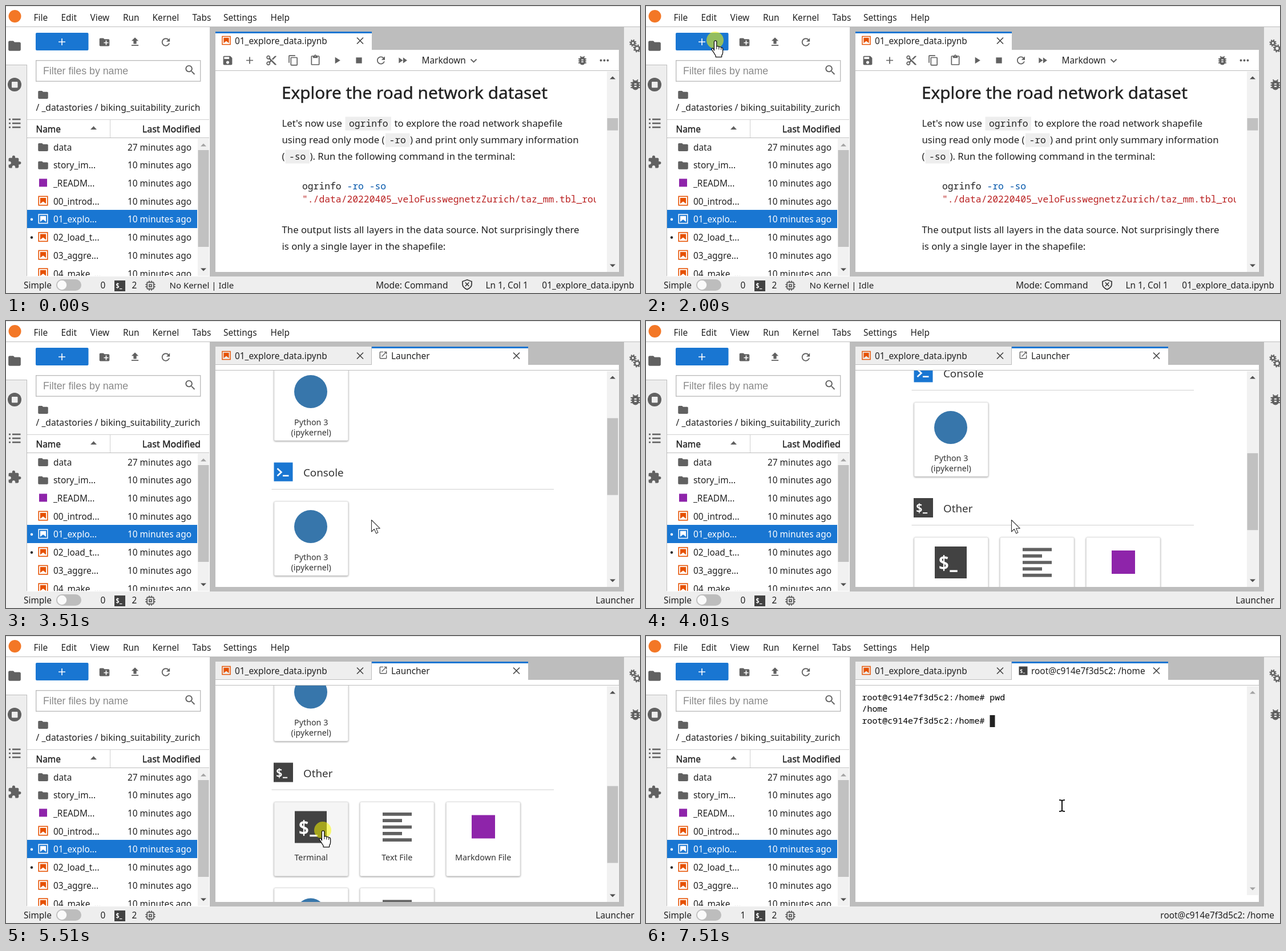
These frames come from a looping animation (1111 px wide and 504 px high, 8 s). An HTML page:

```html
<!DOCTYPE html>
<html lang="en">
<head>
<meta charset="utf-8">
<title>Opening a terminal from the launcher</title>
<style>
html, body { margin: 0; width: 100%; height: 100%; overflow: hidden; background: #fff; }
svg { display: block; width: 100%; height: 100%; }
text { font: 15.4px "Noto Sans", sans-serif; fill: #212121; white-space: pre; }
.medium { stroke: #212121; stroke-width: .4; }
.body { font-size: 16.73px; }
.code { font: 16.35px "Noto Sans Mono", monospace; }
.term { font: 14.93px "Noto Sans Mono", monospace; fill: #000; }
.section { font-size: 18.8px; fill: #333; }
.label { font-size: 14.3px; fill: #333; text-anchor: middle; }
.hint { font: 17.8px "Liberation Sans", Arial, sans-serif; fill: #8a8a8a; }
.end { text-anchor: end; }
.white { fill: #fff; }
.card { filter: drop-shadow(0 1px 1.5px rgba(0,0,0,.4)); }
</style>
</head>
<body>
<svg id="stage" viewBox="0 0 1111 504">
  <defs>
    <clipPath id="files"><rect x="37" y="232" width="300" height="242"/></clipPath>
    <clipPath id="pane"><rect x="367" y="87" width="686" height="380"/></clipPath>
    <clipPath id="codeBox"><rect x="500" y="300" width="534" height="60"/></clipPath>
    <clipPath id="tabText"><rect x="641" y="45" width="244" height="32"/></clipPath>
  </defs>
  <g id="frame"></g>
  <g id="view"></g>
  <g id="pointer"></g>
</svg>
<script>
const GREY = '#616161', LINE = '#bdbdbd', BLUE = '#1976d2', ORANGE = '#e65100', PURPLE = '#8e24aa';
const HOST = 'root@c914e7f3d5c2';
const FILE = '01_explore_data.ipynb';
const LOOP = 8000;

const icons = {
  folder: 'M10 4H4c-1.1 0-2 .9-2 2v12c0 1.1.9 2 2 2h16c1.1 0 2-.9 2-2V8c0-1.1-.9-2-2-2h-8l-2-2z',
  puzzle: 'M20.5 11H19V7c0-1.1-.9-2-2-2h-4V3.5C13 2.12 11.88 1 10.5 1S8 2.12 8 3.5V5H4c-1.1 0-2 .9-2 2v3.8h1.5c1.49 0 2.7 1.21 2.7 2.7s-1.21 2.7-2.7 2.7H2V20c0 1.1.9 2 2 2h3.8v-1.5c0-1.49 1.21-2.7 2.7-2.7s2.7 1.21 2.7 2.7V22H17c1.1 0 2-.9 2-2v-4h1.5c1.38 0 2.5-1.12 2.5-2.5S21.88 11 20.5 11z',
  upload: 'M5 20h14v-2H5v2zM5 10h4v6h6v-6h4l-7-7-7 7z',
  refresh: 'M17.65 6.35C16.2 4.9 14.21 4 12 4c-4.42 0-8 3.58-8 8s3.58 8 8 8c3.73 0 6.84-2.55 7.73-6h-2.08c-.82 2.33-3.04 4-5.65 4-3.31 0-6-2.69-6-6s2.69-6 6-6c1.66 0 3.14.69 4.22 1.78L13 11h7V4l-2.35 2.35z',
  search: 'M15.5 14h-.79l-.28-.27C15.41 12.59 16 11.11 16 9.5 16 5.91 13.09 3 9.5 3S3 5.91 3 9.5 5.91 16 9.5 16c1.61 0 3.09-.59 4.23-1.57l.27.28v.79l5 4.99L20.49 19l-4.99-5zm-6 0C7.01 14 5 11.99 5 9.5S7.01 5 9.5 5 14 7.01 14 9.5 11.99 14 9.5 14z',
  save: 'M17 3H5c-1.11 0-2 .9-2 2v14c0 1.1.89 2 2 2h14c1.1 0 2-.9 2-2V7l-4-4zm-5 16c-1.66 0-3-1.34-3-3s1.34-3 3-3 3 1.34 3 3-1.34 3-3 3zm3-10H5V5h10v4z',
  cut: 'M9.64 7.64c.23-.5.36-1.05.36-1.64 0-2.21-1.79-4-4-4S2 3.79 2 6s1.79 4 4 4c.59 0 1.14-.13 1.64-.36L10 12l-2.36 2.36C7.14 14.13 6.59 14 6 14c-2.21 0-4 1.79-4 4s1.79 4 4 4 4-1.79 4-4c0-.59-.13-1.14-.36-1.64L12 14l7 7h3v-1L9.64 7.64zM6 8c-1.1 0-2-.89-2-2s.9-2 2-2 2 .89 2 2-.9 2-2 2zm0 12c-1.1 0-2-.89-2-2s.9-2 2-2 2 .89 2 2-.9 2-2 2zM19 3l-6 6 2 2 7-7V3z',
  copy: 'M16 1H4c-1.1 0-2 .9-2 2v14h2V3h12V1zm3 4H8c-1.1 0-2 .9-2 2v14c0 1.1.9 2 2 2h11c1.1 0 2-.9 2-2V7c0-1.1-.9-2-2-2zm0 16H8V7h11v14z',
  paste: 'M19 2h-4.18C14.4.84 13.3 0 12 0s-2.4.84-2.82 2H5c-1.1 0-2 .9-2 2v16c0 1.1.9 2 2 2h14c1.1 0 2-.9 2-2V4c0-1.1-.9-2-2-2zm-7 0c.55 0 1 .45 1 1s-.45 1-1 1-1-.45-1-1 .45-1 1-1zm7 18H5V4h2v3h10V4h2v16z',
  play: 'M8 5v14l11-7z',
  stop: 'M5.5 5.5h13v13h-13z',
  forward: 'M4 18l8.5-6L4 6v12zm9-12v12l8.5-6L13 6z',
  bug: 'M20 8h-2.81c-.45-.78-1.07-1.45-1.82-1.96L17 4.41 15.59 3l-2.17 2.17a6 6 0 0 0-2.83 0L8.41 3 7 4.41l1.62 1.63C7.88 6.55 7.26 7.22 6.81 8H4v2h2.09c-.05.33-.09.66-.09 1v1H4v2h2v1c0 .34.04.67.09 1H4v2h2.81c1.04 1.79 2.97 3 5.19 3s4.15-1.21 5.19-3H20v-2h-2.09c.05-.33.09-.66.09-1v-1h2v-2h-2v-1c0-.34-.04-.67-.09-1H20V8zm-6 8h-4v-2h4v2zm0-4h-4v-2h4v2z',
  open: 'M19 19H5V5h7V3H5c-1.11 0-2 .9-2 2v14c0 1.1.89 2 2 2h14c1.1 0 2-.9 2-2v-7h-2v7zM14 3v2h3.59l-9.83 9.83 1.41 1.41L19 6.41V10h2V3h-7z',
  lines: 'M15 15H3v2h12v-2zm0-8H3v2h12V7zM3 13h18v-2H3v2zm0 8h18v-2H3v2zM3 3v2h18V3H3z',
  chip: 'M15 9H9v6h6V9zm-2 4h-2v-2h2v2zm8-2V9h-2V7c0-1.1-.9-2-2-2h-2V3h-2v2h-2V3H9v2H7c-1.1 0-2 .9-2 2v2H3v2h2v2H3v2h2v2c0 1.1.9 2 2 2h2v2h2v-2h2v2h2v-2h2c1.1 0 2-.9 2-2v-2h2v-2h-2v-2h2zm-4 6H7V7h10v10z'
};

const rect = (x, y, w, h, fill, more = '') => `<rect x="${x}" y="${y}" width="${w}" height="${h}" fill="${fill}" ${more}/>`;
const circle = (x, y, r, fill, more = '') => `<circle cx="${x}" cy="${y}" r="${r}" fill="${fill}" ${more}/>`;
const path = (d, fill, more = '') => `<path d="${d}" fill="${fill}" ${more}/>`;
const stroke = (d, color, w) => path(d, 'none', `stroke="${color}" stroke-width="${w}"`);
const text = (x, y, s, cls = '', more = '') => `<text x="${x}" y="${y}" class="${cls}" ${more}>${s}</text>`;
const icon = (name, x, y, size, fill = GREY) =>
  path(icons[name], fill, `transform="translate(${x} ${y}) scale(${size / 24}) translate(-12 -12)"`);
const plus = (x, y, r, color, w) => stroke(`M${x - r} ${y}h${2 * r}M${x} ${y - r}v${2 * r}`, color, w);
const cross = (x, y) => stroke(`M${x - 5.5} ${y - 5.5}l11 11m0-11l-11 11`, '#424242', 1.6);

// Framed bookmark, w is the outer width
function notebook(x, y, w, color = ORANGE) {
  const k = w / 18.4;
  return `<g transform="translate(${x} ${y}) scale(${k})">` +
    rect(-8.4, -8.4, 16.8, 16.8, 'none', `stroke="${color}" stroke-width="1.7"`) +
    path('M5.5 5.5L0 1.2-5.5 5.5v-11h11z', color) + '</g>';
}

function terminalIcon(x, y, w) {
  return rect(x - w / 2, y - w / 2, w, w, '#424242') +
    text(x - w * .4, y + w * .24, '$', 'white', `style="font:600 ${w * .62}px 'Noto Sans Mono',monospace"`) +
    rect(x - w * .03, y + w * .24, w * .24, w * .06, '#fff');
}

function scrollbar(x, top, bottom, thumb, upOn, downOn) {
  const arrow = (y, dir, on) => path(`M${x - 5} ${y + 2.5 * dir}h10l-5 ${-5 * dir}z`, on ? '#505050' : '#a3a3a3');
  return rect(x - 10, top, 20, bottom - top, '#f1f1f1') +
    (thumb ? rect(x - 9.5, thumb[0], 19, thumb[1], '#c1c1c1') : '') +
    arrow(top + 11, 1, upOn) + arrow(bottom - 11, -1, downOn);
}

function gear(x, y, r) {
  return circle(x, y, r, 'none', `stroke="${GREY}" stroke-width="2.6"`) +
    circle(x, y, r + 2, 'none', `stroke="${GREY}" stroke-width="2" stroke-dasharray="${(r + 2) * Math.PI / 8}"`);
}

function fileRow([name, kind, age = 10], i) {
  const y = 248 + 31.7 * i, on = i === 4, cls = on ? 'white' : '';
  const mark = kind === 'dir' ? icon('folder', 65, y, 21)
    : kind === 'md' ? rect(58, y - 8, 14, 14, PURPLE)
    : notebook(65, y - 1, 17, on ? '#fff' : ORANGE);
  return (on ? rect(37, 358, 298, 32, BLUE) : '') + mark +
    (i === 4 || i === 5 ? circle(45, y, 2.2, on ? '#fff' : '#212121') : '') +
    text(83, y + 5.6, name, cls) + text(325, y + 5.6, age + ' minutes ago', cls + ' end');
}

function drawFrame() {
  const menu = [['File', 48.5], ['Edit', 96.5], ['View', 147.5], ['Run', 205], ['Kernel', 256.5], ['Tabs', 326.5], ['Settings', 381], ['Help', 463.5]];
  const files = [['data', 'dir', 27], ['story_im...', 'dir'], ['_READM...', 'md'], ['00_introd...'], ['01_explo...'], ['02_load_t...'], ['03_aggre...'], ['04_make_...']];
  return rect(0, 0, 1111, 504, '#fff') + rect(0, 0, 1111, 1, '#e0e0e0') +
    circle(15.5, 18, 11, '#f37726') +
    menu.map(([s, x]) => text(x, 26, s)).join('') +
    // side bars and dock
    rect(0, 36, 1111, 1, LINE) + rect(0, 103, 37, 372, '#eee') + rect(1083, 37, 28, 438, '#eee') +
    rect(357, 37, 726, 438, LINE) + rect(0, 103, 37, 1, LINE) + rect(36, 103, 1, 371, LINE) +
    icon('folder', 15, 70, 26) +
    circle(15, 138, 12, GREY) + rect(10, 133, 10.5, 10.5, '#eee', 'rx="1"') +
    [199, 206, 213].map(y => rect(5, y - 1.3, 3, 2.6, GREY) + rect(11, y - 1.3, 14.5, 2.6, GREY)).join('') +
    icon('puzzle', 15, 274, 25) + gear(1098.5, 65, 3.2) + gear(1106, 74.5, 4) + icon('bug', 1103, 138, 25) +
    // file browser
    rect(52, 47, 92.5, 31, BLUE, 'rx="2"') + plus(98, 63, 6, '#fff', 1.6) +
    icon('folder', 172.5, 63.5, 21) + plus(175.5, 64.5, 4, '#fff', 1.7) +
    icon('upload', 226, 63, 21) + icon('refresh', 280, 63.5, 21.5) +
    rect(52.7, 95.7, 288, 36.5, '#fff', `stroke="${LINE}" stroke-width="1.4"`) +
    text(65, 119.8, 'Filter files by name', 'hint') + icon('search', 323, 112.5, 23) +
    icon('folder', 65, 156, 21) +
    text(52.5, 184, '/ _datastories / biking_suitability_zurich', '', 'style="font-size:15.65px"') +
    rect(37, 199, 319, 1, '#d0d0d0') + rect(37, 231, 319, 1, LINE) + rect(182, 199, 1, 32, '#d0d0d0') +
    text(52.5, 221.8, 'Name', 'medium') + path('M148 217h11l-5.5-6z', GREY) +
    text(341, 221.8, 'Last Modified', 'medium end', 'style="font-size:16.1px"') +
    `<g clip-path="url(#files)">${files.map(fileRow).join('')}</g>` +
    scrollbar(346, 233, 474, [253, 170], false, true) +
    // status bar
    rect(0, 475, 1111, 29, '#eee') + text(31, 495.5, 'Simple') +
    rect(88, 480, 44, 20, LINE, 'rx="10"') + circle(98, 490, 8.2, '#fafafa') +
    terminalIcon(199.5, 491.5, 19) + text(220.5, 496, '2') + icon('chip', 253, 491, 23);
}

function tab(x, label, mark, active) {
  return rect(x, 45, 274, 32, active ? '#fff' : '#eee') +
    (active ? rect(x, 45, 274, 3, BLUE) : rect(x + 273, 45, 1, 32, LINE) + rect(x, 76, 274, 1, LINE)) +
    mark + `<g${x > 400 ? ' clip-path="url(#tabText)"' : ''}>${text(x + 34, 67, label)}</g>` + cross(x + 253.5, 61);
}

const fileTab = active => tab(367, FILE, notebook(386, 60.5, 15.5), active);
const pane = () => rect(367, 77, 707, 390, '#fff');
const counter = n => text(165.5, 496, n);

function notebookView() {
  const toolbar = [['save', 388.5, 21], ['cut', 465, 21], ['copy', 503.5, 20], ['paste', 542, 20], ['play', 580, 20],
    ['stop', 618.5, 19], ['refresh', 657, 21], ['forward', 695, 20], ['bug', 1010, 21]];
  const chip = (x, y, w, s) => rect(x, y - 17.5, w, 24, '#eee') + text(x + 6.5, y, s, 'code');
  return pane() + fileTab(true) +
    toolbar.map(([n, x, s]) => icon(n, x, 95.5, s)).join('') + plus(427, 95.5, 6, GREY, 1.7) +
    text(728.5, 100.5, 'Markdown') + stroke('M814.5 93.5l5 5 5-5', GREY, 1.8) +
    [1042.5, 1048.5, 1054.5].map(x => circle(x, 95.5, 1.9, GREY)).join('') +
    rect(367, 113, 707, 1, LINE) +
    text(483, 163, 'Explore the road network dataset', 'medium', 'style="font-size:29.75px"') +
    text(483.5, 212, "Let's now use ", 'body') + chip(594.5, 212, 80.5, 'ogrinfo') +
    text(680.5, 212, 'to explore the road network shapefile', 'body') +
    text(483.5, 241, 'using read only mode (', 'body') + chip(665, 241, 42.5, '-ro') +
    text(708, 241, ') and print only summary information', 'body') +
    text(483.5, 270, '(', 'body') + chip(489.5, 270, 42.5, '-so') +
    text(532.5, 270, '). Run the following command in the terminal:', 'body') +
    '<g clip-path="url(#codeBox)">' +
    text(519, 321.5, 'ogrinfo <tspan fill="#05a">-ro -so</tspan>', 'code') +
    text(519, 344.8, '"./data/20220405_veloFusswegnetzZurich/taz_mm.tbl_routennetz', 'code', 'style="fill:#ba2121"') + '</g>' +
    text(483.5, 399, 'The output lists all layers in the data source. Not surprisingly there', 'body') +
    text(483.5, 427.5, 'is only a single layer in the shapefile:', 'body') +
    scrollbar(1063, 115, 467, [197, 21.5], true, true) +
    counter(0) + text(286.5, 496, 'No Kernel | Idle', '', 'style="font-size:15px"') +
    text(774.5, 496, 'Mode: Command', 'end', 'style="font-size:15.6px"') + text(840.5, 496, 'Ln 1, Col 1') +
    stroke('M808 480.8l8 3v5q0 5.5-8 9-8-3.5-8-9v-5z', '#333', 1.7) +
    stroke('M804.8 485.5l6.5 6.5m0-6.5l-6.5 6.5', '#333', 1.6) +
    text(1101, 496, FILE, 'end');
}

function card(x, y, mark, labels, fill = '#fff') {
  return rect(x, y, 129.5, 130, fill, 'rx="2" class="card" stroke="#e0e0e0" stroke-width=".8"') + mark +
    labels.map((s, i) => text(x + 64.7, y + 102.5 + 18 * i, s, 'label')).join('');
}

function launcherView({ scroll, pressed }) {
  const section = (y, name, mark) => mark + text(521, y + 8, name, 'section') + rect(465.5, y + 30, 494.5, 1, '#d0d0d0');
  const kernel = y => card(470, y, circle(534, y + 44, 29, '#3776ab'), ['Python 3', '(ipykernel)']);
  const consoleIcon = rect(469.5, 422.5, 33, 33, BLUE) +
    stroke('M475.5 433l7 6.5-7 6.5', '#fff', 2.6) + rect(485, 444.5, 10.5, 2.5, '#fff');
  return pane() + fileTab(false) + tab(641, 'Launcher', icon('open', 661, 60, 17), true) +
    rect(367, 86, 707, 1, LINE) +
    `<g clip-path="url(#pane)"><g transform="translate(0 ${-scroll})">` +
    text(460, 148, '_datastories/biking_suitability_zurich', '', 'style="font-size:18.5px"') +
    section(202.5, 'Notebook', notebook(486, 202, 34)) + kernel(254) +
    section(439, 'Console', consoleIcon) + kernel(491) +
    section(676, 'Other', terminalIcon(486, 676, 34)) +
    card(470, 728, terminalIcon(534, 772, 56), ['Terminal'], pressed ? '#f5f5f5' : '#fff') +
    card(620.5, 728, icon('lines', 685.5, 772, 68), ['Text File']) +
    card(771.5, 728, rect(816, 751, 41, 41, PURPLE), ['Markdown File']) +
    card(470, 879, circle(534, 923, 26, '#3776ab'), []) +
    card(620.5, 879, rect(660, 900, 51, 42, GREY), []) +
    '</g></g>' + scrollbar(1063, 88, 467, [109 + scroll * .354, 135], scroll > 0, true) +
    counter(0) + text(1101, 496, 'Launcher', 'end');
}

function terminalView({ typed, ran }) {
  const prompt = HOST + ':/home# ', cell = 8.96;
  const rows = ran ? [prompt + typed, '/home', prompt] : [prompt + typed];
  const last = rows.length - 1;
  return pane() + fileTab(false) + tab(641, HOST + ': /home', terminalIcon(661, 61, 15), true) +
    rect(367, 86, 707, 1, LINE) +
    rows.map((s, i) => text(378.5, 112.5 + 20.5 * i, s, 'term')).join('') +
    rect(378.5 + rows[last].length * cell, 98 + 20.5 * last, 9, 21, '#222') +
    scrollbar(1063, 88, 455, null, false, false) +
    counter(1) + text(1101, 496, HOST + ': /home', 'end');
}

const views = { notebook: notebookView, launcher: launcherView, terminal: terminalView };

const outlined = (d, color, w) => path(d, '#fff', `stroke="${color}" stroke-width="${w}" stroke-linejoin="round"`);
const pointers = {
  none: '',
  arrow: outlined('M.5.5v20.5l4.8-4.6 3.4 7.6 3.2-1.4-3.3-7.4h6.6z', '#333', 1.1),
  hand: outlined('M-2.6 17V2a2.2 2.2 0 0 1 4.4 0v8q3-1 4 .8 3-.6 3.8 1.2 3-.4 3 2.6v6q0 3-2 5v3h-10.5v-2.5q-1.8-2-3.2-5l-3.4-5q-1-2.4 1-3 1.6-.2 2.9 3.9z', '#111', 1.3) +
    stroke('M1.8 10v5M5.8 11v4.5M9.6 12.5v3.5', '#111', 1),
  beam: stroke('M-5-10q4 0 5 1.5 1-1.5 5-1.5M0-9V9M-5 10q4 0 5-1.5 1 1.5 5 1.5', '#111', 2)
};

// Each step changes some of the state and holds until the next one
const start = { view: 'notebook', pointer: 'none', x: 0, y: 0, scroll: 0, pressed: false, typed: '', ran: false };
const steps = [
  [0, {}],
  [500, { pointer: 'arrow', x: 852, y: 423 }],
  [990, { x: 289, y: 139 }],
  [1490, { pointer: 'hand', x: 122, y: 61 }],
  [2000, { pressed: true }],
  [2530, { pressed: false, view: 'launcher' }],
  [2990, { pointer: 'arrow', x: 640, y: 349 }],
  [3510, { scroll: 174 }],
  [4010, { scroll: 348 }],
  [4510, { scroll: 434.5 }],
  [5010, { scroll: 436.5, pointer: 'hand', x: 556, y: 342 }],
  [5510, { pressed: true }],
  [6010, { pressed: false, view: 'terminal', pointer: 'beam', x: 704, y: 295 }],
  [6510, { x: 729, y: 298 }],
  [7010, { typed: 'pw' }],
  [7510, { typed: 'pwd', ran: true }]
];
const states = [];
steps.reduce((s, [, change]) => (states.push(s = { ...s, ...change }), s), start);

const byId = id => document.getElementById(id);
let shown = -1;

function render(ms) {
  const t = ms % LOOP;
  const i = steps.filter(([at]) => at <= t).length - 1;
  if (i === shown) return;
  shown = i;
  const s = states[i];
  byId('view').innerHTML = views[s.view](s);
  byId('pointer').innerHTML =
    (s.pressed ? circle(s.x - 1, s.y - 1, 15, '#f8f800', 'fill-opacity=".55"') : '') +
    `<g transform="translate(${s.x} ${s.y})">${pointers[s.pointer]}</g>`;
}

byId('frame').innerHTML = drawFrame();
const began = performance.now();
function tick() {
  render(Math.max(0, performance.now() - began));
  requestAnimationFrame(tick);
}
tick();
</script>
</body>
</html>
```
